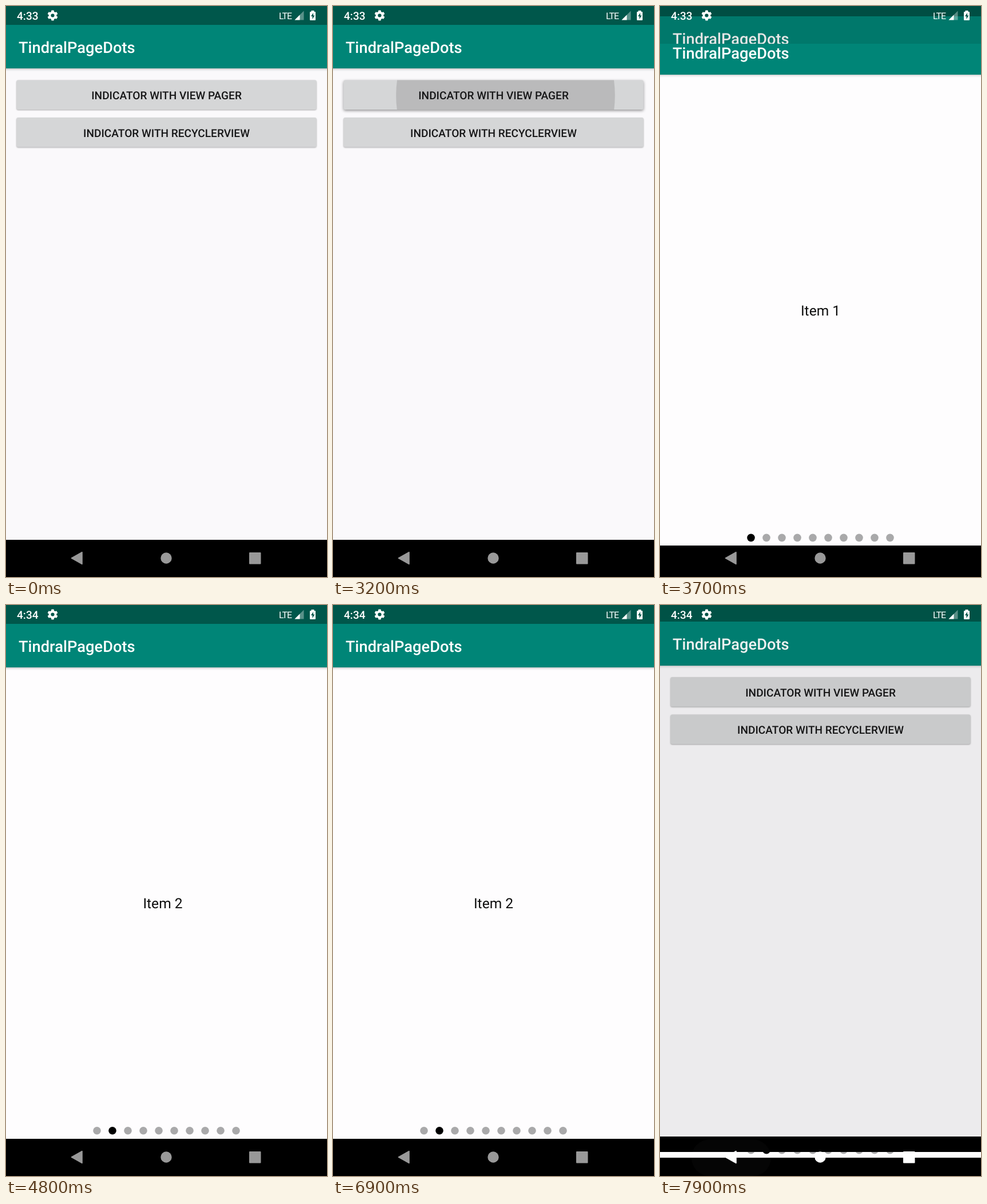
An HTML page that plays this animation: 561x998 px, repeating every 8 s.

```html
<!DOCTYPE html>
<html lang="en">
<head>
<meta charset="utf-8">
<title>Page dots</title>
<style>
  html, body { margin: 0; width: 100%; height: 100%; overflow: hidden; background: #000; }
  svg { display: block; width: 100vw; height: 100vh; font-family: Roboto, sans-serif; text-rendering: geometricPrecision; }
  .title { font-size: 27.27px; font-weight: 500; fill: #fff; }
  .label { font-size: 19.09px; font-weight: 500; fill: #161617; text-anchor: middle; }
  .item { font-size: 24.54px; fill: #0c0c0c; text-anchor: middle; }
  .crisp { shape-rendering: crispEdges; }
  .shade { filter: drop-shadow(0 2px 2px rgba(0, 0, 0, .3)); }
  .btn { fill: #d5d6d7; filter: drop-shadow(0 1.5px 1.2px rgba(0, 0, 0, .32)); }
  .btn.down { filter: drop-shadow(0 2px 2.5px rgba(0, 0, 0, .42)); }
</style>
</head>
<body>
<svg viewBox="0 0 561 998" preserveAspectRatio="none">
  <defs>
    <clipPath id="btnClip"><rect x="18.5" y="129.5" width="524" height="51.5" rx="2.7"/></clipPath>
    <clipPath id="revealClip"><rect id="reveal" width="561" height="998"/></clipPath>
    <g id="chrome">
      <rect class="shade" x="-12" y="20" width="585" height="88" fill="#008577"/>
      <rect class="crisp" y="20" width="561" height="89.2" fill="#008577"/>
      <rect class="crisp" width="561" height="32.7" fill="#00574b"/>
      <text class="title" x="22" y="81.5">TindralPageDots</text>
      <rect class="crisp" y="932.6" width="561" height="66"/>
    </g>
  </defs>

  <rect width="561" height="998"/>

  <g id="menu">
    <rect width="561" height="998" fill="#faf9fb"/>
    <use href="#chrome"/>
    <rect id="btn" class="btn" x="18.5" y="129.5" width="524" height="51.5" rx="2.7"/>
    <rect class="btn" x="18.5" y="195" width="524" height="51.5" rx="2.7"/>
    <g clip-path="url(#btnClip)"><circle id="ripple" cx="301.5" cy="156"/></g>
    <text class="label" x="280.5" y="163">INDICATOR WITH VIEW PAGER</text>
    <text class="label" x="280.5" y="228.5">INDICATOR WITH RECYCLERVIEW</text>
  </g>

  <g id="pager">
    <g clip-path="url(#revealClip)">
      <rect width="561" height="998" fill="#fefdfe"/>
      <use href="#chrome"/>
      <g id="items"></g>
      <g id="dots"></g>
    </g>
  </g>

  <g fill="#fff">
    <text id="clock" x="19" y="24" font-size="19.09" font-weight="500">4:33</text>
    <g id="gear" transform="translate(81.5 16.5)">
      <circle r="5" fill="none" stroke="#fff" stroke-width="3.8"/>
    </g>
    <text x="477" y="22.5" font-size="16" letter-spacing="-1">LTE</text>
    <path d="M504.5 24.5L520.5 8.5V24.5Z" opacity=".35"/>
    <path d="M504.5 24.5L513.5 15.5V24.5Z"/>
    <path d="M533.5 10V8h5v2h1.5q1 0 1 1v13q0 1-1 1h-8q-1 0-1-1V11q0-1 1-1Z"/>
    <path d="M537 12l-4 6h2.5v5l4-6.5h-2.5Z" fill="#00574b"/>
  </g>

  <rect id="navRipple" fill="#fff"/>
  <g id="nav" stroke-linejoin="round">
    <path d="M114.6 965L132.8 954.8V975.2Z" stroke-width="2"/>
    <circle cx="280" cy="965" r="9.7" stroke="none"/>
    <rect x="426" y="956" width="18.5" height="18.5" stroke-width="2"/>
  </g>
</svg>

<script>
const LOOP = 8000, STEP = 100, WIDTH = 561;
const OPEN = 3499, CLOSE = 7667.7, SLIDE = 425;
const TAP = 3135, RELEASE = 3380, BACK = 7450;
// start time and direction of each swipe
const SWIPES = [[4312, 1], [4780, 1], [5153, 1], [5435, 1], [5823, -1], [6195, -1], [6520, -1]];
const DRAG = 150, SETTLE = 250;

const $ = id => document.getElementById(id);
const set = (el, attrs) => { for (const k in attrs) el.setAttribute(k, attrs[k]); };
const add = (parent, tag, attrs, text = '') => {
  const el = document.createElementNS('http://www.w3.org/2000/svg', tag);
  set(el, attrs);
  el.textContent = text;
  parent.appendChild(el);
  return el;
};
const clamp = x => Math.max(0, Math.min(1, x));

const cubic = (u, a, b, c, d) => {
  const v = 1 - u;
  return v * v * v * a + 3 * v * v * u * b + 3 * v * u * u * c + u * u * u * d;
};
// y of a Bezier curve at x, by bisection
function curveAt(x, xs, ys) {
  let lo = 0, hi = 1;
  for (let i = 0; i < 30; i++) {
    const mid = (lo + hi) / 2;
    if (cubic(mid, ...xs) < x) lo = mid; else hi = mid;
  }
  return cubic(lo, ...ys);
}
const slowIn = x => x <= 0 ? 0 : x >= 1 ? 1 : curveAt(x, [0, .4, .2, 1], [0, 0, 1, 1]);
const extraSlowIn = x => x <= 0 ? 0 : x >= 1 ? 1
  : x < 1 / 6 ? curveAt(x, [0, .05, .1333, 1 / 6], [0, 0, .06, .4])
  : curveAt(x, [1 / 6, .2083, .25, 1], [.4, .82, 1, 1]);

// finger drag, then a quintic settle
function swipe(ms) {
  if (ms <= 0) return 0;
  if (ms < DRAG) return .357 * Math.pow(ms / DRAG, 1.7);
  return 1 - .643 * Math.pow(1 - clamp((ms - DRAG) / SETTLE), 5);
}

for (let a = 0; a < 360; a += 60)
  add($('gear'), 'rect', { x: -2.3, y: -9, width: 4.6, height: 4, rx: .8, transform: `rotate(${a})` });
const items = [1, 2, 3, 4, 5].map(n => add($('items'), 'text', { class: 'item', y: 530.4 }, 'Item ' + n));
const dots = Array.from({ length: 10 }, (_, i) => add($('dots'), 'circle', { cx: 159 + 27 * i, cy: 918.7, r: 6.8 }));

function drawWindows(t) {
  const k = (t - OPEN) / SLIDE, q = (t - CLOSE) / SLIDE;
  const away = q > 0 ? slowIn(q) : 1 - slowIn(k);
  const shift = 40.9 * away;
  const hidden = 958 * (q > 0 ? extraSlowIn(q) : 1 - extraSlowIn(k));
  const top = Math.round(hidden + shift) - shift; // whole-pixel edge
  const dim = clamp((t - OPEN) / 117) - clamp((t - CLOSE - 83) / 333);
  set($('menu'), { transform: `translate(0 ${-20 * (1 - away)})`, opacity: 1 - .1 * dim });
  set($('pager'), {
    transform: `translate(0 ${shift})`,
    visibility: k > 0 && q < 1 ? 'visible' : 'hidden'
  });
  set($('reveal'), { y: top, height: 1000 - top });
}

function drawPages(t) {
  let pos = 0, page = 0;
  for (const [start, dir] of SWIPES) {
    pos += dir * swipe(t - start);
    if (t - start >= DRAG) page += dir;
  }
  items.forEach((el, i) => set(el, { x: 280.5 + (i - pos) * WIDTH }));
  dots.forEach((el, i) => set(el, { fill: i === page ? '#000' : '#a9a9aa' }));
}

function drawTouch(t) {
  const fade = clamp((t - TAP) / 75) * (1 - clamp((t - RELEASE) / 150));
  set($('ripple'), { r: 157 + 145 * slowIn((t - TAP) / 260), opacity: .15 * fade });
  $('btn').classList.toggle('down', t >= TAP && t < RELEASE + 100);

  const grow = .7 + .3 * slowIn((t - BACK) / 220);
  const w = 139 * grow, h = 64 * grow;
  const glow = t < BACK ? 0 : .165 * clamp((t - BACK) / 80) - .00056 * Math.max(0, t - 7640);
  set($('navRipple'), {
    x: 124.5 - w / 2, y: 966 - h / 2, width: w, height: h, rx: h / 2, opacity: Math.max(0, glow)
  });
  const grey = Math.round(153 + 102 * clamp((t - BACK) / 200));
  const tone = `rgb(${grey},${grey},${grey})`;
  set($('nav'), { fill: tone, stroke: tone });
}

function draw(t) {
  drawWindows(t);
  drawPages(t);
  drawTouch(t);
  $('clock').textContent = t < 4600 ? '4:33' : '4:34';
}

let origin;
function tick(now) {
  origin ??= now;
  draw(Math.floor((now - origin + 15) / STEP) * STEP % LOOP);
  requestAnimationFrame(tick);
}
draw(0);
requestAnimationFrame(tick);
</script>
</body>
</html>
```
